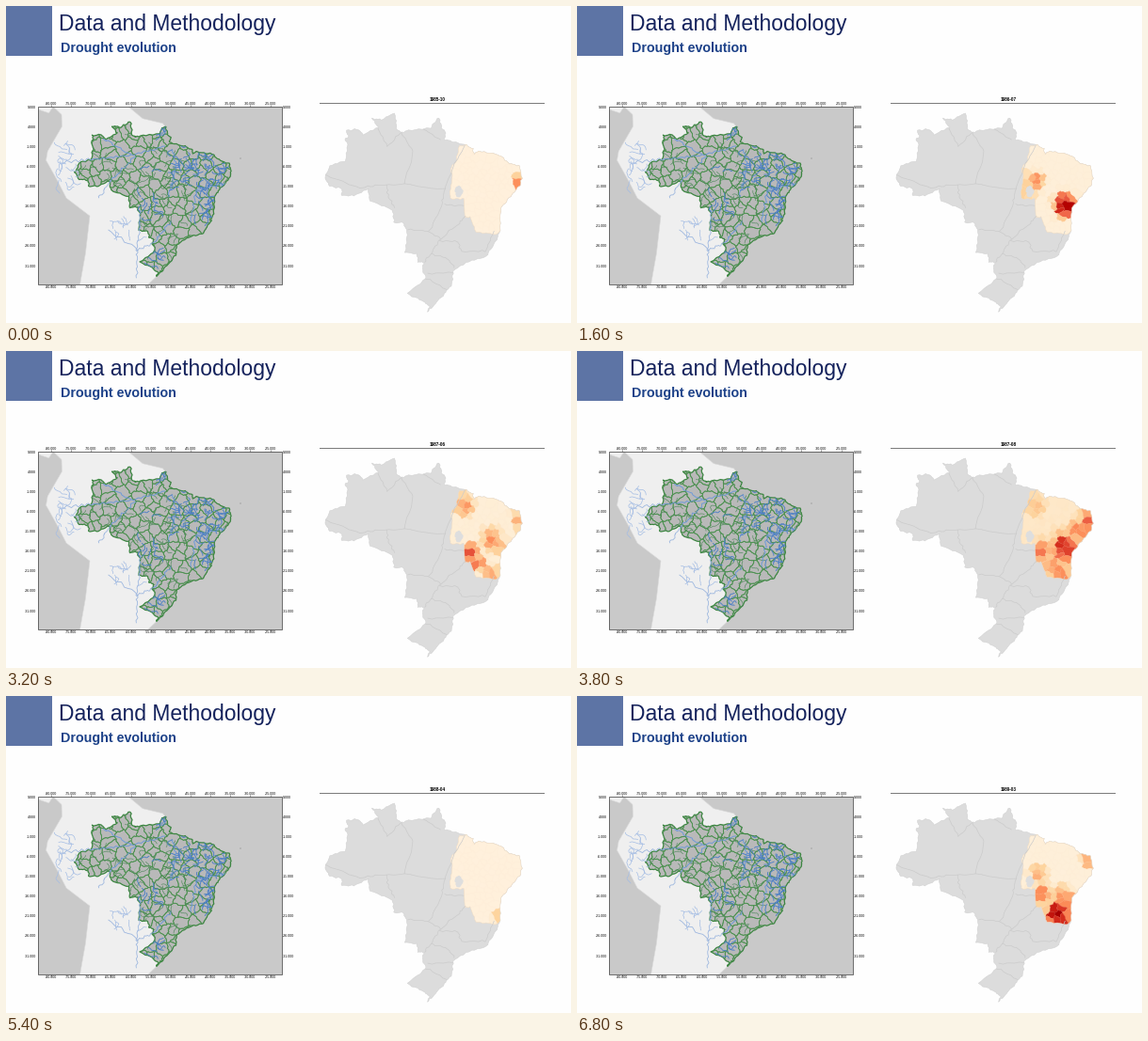
These frames come from a looping animation (600 px wide and 337 px high, 6.85 s). A matplotlib script:

```python
import numpy as np
import matplotlib.pyplot as plt
from matplotlib.animation import FuncAnimation
from matplotlib.collections import LineCollection, PolyCollection
from matplotlib.patches import Circle, Polygon, Rectangle
from matplotlib.path import Path

W, H, DPI = 600, 337, 100
FRAMES, STEP_MS = 137, 50
rng = np.random.default_rng(11)

# Longitude / latitude outlines
BORDER = [
    (-51.6, 4.1), (-52.9, 2.2), (-57.5, 1.7), (-58.9, 1.3), (-59.7, 2),
    (-60.1, 5.2), (-62.8, 3.8), (-64.6, 4.1), (-63.4, 2.4), (-66.3, 0.8),
    (-67.3, 2), (-69.8, 1.7), (-69.3, 0.7), (-70, 0), (-69.4, -1.1),
    (-69.9, -4.3), (-72.9, -5.1), (-74, -7.5), (-73, -9.2), (-70.6, -9.6),
    (-70.6, -11), (-68.3, -11), (-65.4, -9.7), (-65, -12), (-60.5, -13.8),
    (-60.2, -16.3), (-58.4, -16.3), (-57.6, -18.1), (-58, -22.1),
    (-55.7, -22.4), (-55.4, -24), (-54.3, -24.1), (-54.6, -25.5),
    (-53.8, -27.1), (-57.6, -30.2), (-54.6, -31.5), (-53.2, -32.7)]
COAST = [
    (-53.5, -33.7), (-52.1, -32.2), (-50.2, -30.2), (-48.7, -28.3),
    (-48.5, -25.8), (-45.4, -23.8), (-42, -22.95), (-41, -21.5),
    (-39.8, -19.6), (-39.2, -17.8), (-39, -13.5), (-37.4, -11.5),
    (-35.2, -9), (-34.8, -7.5), (-35.3, -5.2), (-37.2, -4.8), (-38.5, -3.7),
    (-39.9, -2.85), (-43.5, -2.4), (-44.3, -2.8), (-44.6, -1.8), (-46, -1.1),
    (-48.4, -0.5), (-50.3, 0), (-49.9, 1.2), (-50.7, 2.1), (-51.2, 3.9)]
ANDES = [
    (-54.9, -35), (-57, -37), (-73, -37), (-71.4, -28), (-70.3, -18.5),
    (-76.2, -14), (-78.5, -9.5), (-81.3, -4.5), (-80.9, -2.2), (-77.3, 4),
    (-77.4, 7), (-79.5, 9), (-80.6, 7.4), (-83.6, 8.4), (-83.6, 10),
    (-61.8, 10), (-57, 6), (-52, 4.8)]
STATES = [
    [(-58.9, 1.3), (-56.3, -2.2), (-58.2, -8.8), (-50.2, -9.8),
     (-50.7, -13), (-53.2, -18)],
    [(-73.8, -7.1), (-66.8, -9.6), (-64, -9), (-58.2, -8.8)],
    [(-61.6, -8.8), (-61.5, -11), (-60.1, -13.5)],
    [(-63.5, 2.2), (-61.5, -1.4), (-58.9, 1.3)],
    [(-54.5, 2.2), (-50.8, -0.3)],
    [(-50.2, -9.8), (-48.4, -5.3), (-46.1, -1.1)],
    [(-57.7, -17.6), (-53.2, -18), (-51, -19.5), (-53, -22.5), (-54.2, -24)],
    [(-53, -22.5), (-50, -23), (-48.1, -25.2)],
    [(-53.7, -26.3), (-48.6, -26)],
    [(-53.8, -27.2), (-49.8, -29.3)],
    [(-51, -19.8), (-47.5, -20), (-46.8, -22), (-42, -21.8), (-40.3, -18)],
    [(-51, -19.5), (-47.3, -16.5), (-46, -15)],
    [(-50.3, -12.8), (-46.2, -13)]]
RIVERS = [
    [(-77, -5), (-70, -4.2), (-60, -3.2), (-51.5, -1)],
    [(-67, 1), (-60, -3.1)],
    [(-68, -14), (-65.4, -10), (-58.7, -3.4)],
    [(-50.7, -14), (-48.6, -6), (-49.5, -2)],
    [(-45, -20), (-43.5, -12), (-36.5, -10.4)],
    [(-66, -22), (-58, -27)],
    [(-57.5, -17), (-58.4, -27), (-58.5, -34)],
    [(-50, -20), (-54.5, -25.5), (-58.5, -27.3)]]


def left(pts):
    x, y = np.asarray(pts, float).T
    return np.c_[48 + (x + 80) * 4.227, 107 + (9 - y) * 4.225]


def right(pts):
    x, y = np.asarray(pts, float).T
    return np.c_[338.5 + (x + 74) * 5.34, 113 + (5.27 - y) * 5.44]


def dense(pts, n=6):
    pts = np.asarray(pts, float)
    t = np.arange(n)[:, None] / n
    segs = [a + (b - a) * t for a, b in zip(pts[:-1], pts[1:])]
    return np.vstack(segs + [pts[-1:]])


def warp(p, a):
    x, y = p.T
    return np.c_[x + a * (np.sin(0.9 * y + 0.3 * x) + 0.6 * np.sin(1.9 * y + 2)),
                 y + a * (np.sin(0.8 * x - 0.4 * y) + 0.6 * np.sin(2.1 * x + 1))]


def sites(x0, y0, x1, y1, step):
    """Jittered staggered grid."""
    pts = []
    for j, y in enumerate(np.arange(y0, y1, step * 0.87)):
        for x in np.arange(x0 + (j % 2) * step / 2, x1, step):
            pts.append((x, y) + rng.uniform(-0.42, 0.42, 2) * step)
    return np.array(pts)


def clip_half(poly, mid, nrm):
    d = (poly - mid) @ nrm
    out = []
    for i in range(len(poly)):
        j = (i + 1) % len(poly)
        if d[i] <= 0:
            out.append(poly[i])
        if d[i] * d[j] < 0:
            out.append(poly[i] + (poly[j] - poly[i]) * d[i] / (d[i] - d[j]))
    return np.array(out)


def cells(pts, reach):
    """Wavy-edged nearest-site cells."""
    out = []
    for p in pts:
        poly = p + reach * np.array([(-1, -1), (1, -1), (1, 1), (-1, 1)])
        dist = np.hypot(*(pts - p).T)
        for q in pts[(dist > 0) & (dist < 2 * reach)]:
            poly = clip_half(poly, (p + q) / 2, q - p)
        out.append(warp(dense(np.vstack([poly, poly[:1]])), 0.55))
    return out


def brook(x, y, n):
    ang = rng.uniform(0, 2 * np.pi) + np.cumsum(rng.normal(0, 0.45, n))
    return np.c_[x + 1.3 * np.cumsum(np.cos(ang)),
                 y + 1.3 * np.cumsum(np.sin(ang))]


def brooks(count, cx, cy, sx, sy, n=10):
    return [brook(rng.normal(cx, sx), rng.normal(cy, sy), n)
            for _ in range(count)]


fig = plt.figure(figsize=(W / DPI, H / DPI), dpi=DPI, facecolor="#fefefe")
ax = fig.add_axes([0, 0, 1, 1])
ax.set(xlim=(0, W), ylim=(H, 0))
ax.axis("off")


def text(x, y, s, px, **kw):
    return ax.text(x, y, s, fontsize=px * 72 / DPI, family="Liberation Sans",
                   va="baseline", **kw)


def shape(pts, color, edge="none", lw=0, clip=None):
    p = ax.add_patch(Polygon(pts, fc=color, ec=edge, lw=lw, joinstyle="round"))
    if clip is not None:
        p.set_clip_path(clip)
    return p


def lines(segs, color, lw, clip):
    c = ax.add_collection(LineCollection(segs, colors=color, linewidths=lw))
    c.set_clip_path(clip)


def frame(**kw):
    return ax.add_patch(Rectangle((33.5, 107), 259, 189, **kw))


# Heading
ax.add_patch(Rectangle((0, 0), 48.5, 53, fc="#5d74a5", lw=0))
text(56.5, 26, "Data and Methodology", 22.9, color="#14225c")
text(57.5, 48.8, "Drought evolution", 14.2, color="#1d4289", weight="bold")

# River basin map
box = frame(fc="#c9c9c9", lw=0)
shape(left(COAST[::-1] + ANDES), "#efefef", "#dadada", 0.4, box)
rim = BORDER + COAST + BORDER[:1]
outline = warp(dense(left(rim)), 0.5)
brazil = shape(outline, "#b9b9b9", clip=box)

streams = [warp(dense(left(r), 14), 0.9) for r in RIVERS]
lines(streams, "#9db7df", 0.6, box)
lines(cells(sites(70, 118, 245, 292, 11.5), 20), "#4c9150", 0.6, brazil)
lines(brooks(130, 150, 190, 38, 38), "#4f8a5c", 0.45, brazil)
lines(streams, "#6f97cf", 0.6, brazil)
lines(brooks(36, 194, 170, 16, 12) + brooks(34, 215, 205, 7, 16)
      + brooks(12, 230, 176, 5, 7) + brooks(8, 168, 136, 3, 6)
      + brooks(14, 165, 270, 9, 11) + brooks(12, 150, 212, 8, 10),
      "#4d80c6", 0.65, brazil)
lines(brooks(16, 60, 172, 7, 12, 14) + brooks(10, 126, 240, 12, 6),
      "#a3bce4", 0.5, box)
shape(outline, "none", "#3c8541", 0.9, box)
ax.add_patch(Circle((249, 162), 0.6, fc="#888888", lw=0))
frame(fc="none", ec="#555555", lw=0.6)

for i in range(12):
    x, name = 48 + i * 21.14, f"{-80 + 5 * i}.000"
    for y, tick in ((104.8, 106), (300.4, 297)):
        text(x, y, name, 3.6, ha="center")
        ax.plot([x, x], [tick - 0.8, tick + 0.8], color="#555555", lw=0.4)
for i in range(9):
    y, name = 108.7 + i * 21.1, f"{9 - 5 * i}.000"
    text(32, y, name, 3.6, ha="right")
    text(293.8, y, name, 3.6, ha="left")

# Drought map
ax.plot([333, 571], [103, 103], color="#777777", lw=0.7)
stamp = text(458.5, 100.9, "", 4.6, ha="center", weight="bold")
country = shape(warp(dense(right(rim)), 0.5), "#dcdcdc", "#d2d2d2", 0.4)
lines([warp(dense(right(s)), 0.7) for s in STATES], "#cbcbcb", 0.5, country)

EDGE = [(481, 149), (478, 166), (472, 172), (474, 181), (471, 201),
        (474, 205), (486, 205), (487, 225), (493, 224), (499, 240), (521, 243)]
shore = right(COAST[COAST.index((-39.2, -17.8)):COAST.index((-46, -1.1)) + 1])
region = shape(warp(dense(np.vstack([shore, EDGE, shore[:1]])), 0.5), "#fdf2e3")
seeds = sites(468, 144, 553, 248, 7.2)
seeds = seeds[Path(region.get_xy()).contains_points(seeds, radius=4)]
areas = PolyCollection(cells(seeds, 16), linewidths=0.3)
ax.add_collection(areas)
areas.set_clip_path(region)
turn = np.linspace(0, 2 * np.pi, 25)
shape(warp(np.c_[481 + 4.2 * np.cos(turn), 197 + 6 * np.sin(turn)], 0.6),
      "#dedede")
shape(region.get_xy(), "none", "#ead9c4", 0.35)

# Months since Oct 1985 at set frames, with blobs of x, y, radius, level
KEY_FRAMES = [0, 32, 49, 64, 88, 108, 136]
KEY_MONTHS = [0, 9, 17, 20, 24, 30, 41]
BASES = [0.02, 0.03, 0.05, 0.04, 0.15, 0.02, 0.03]
BLOBS = [
    [(543, 185, 4, 0.5)],
    [(518, 212, 9, 0.8), (489, 186, 6, 0.47), (480, 190, 11, 0.23)],
    [(495, 211, 11, 1.05), (483, 186, 13, 0.9), (493, 167, 9, 0.72),
     (517, 168, 11, 0.55), (512, 218, 13, 0.6), (531, 166, 9, 0.3)],
    [(487, 164, 8, 0.42), (494, 214, 7, 0.58), (516, 200, 9, 0.44),
     (502, 226, 5, 0.66), (541, 181, 5, 0.34), (513, 236, 6, 0.38)],
    [(517, 211, 11, 1.08), (532, 190, 8, 0.9), (542, 182, 8, 0.78),
     (510, 235, 9, 0.58), (493, 209, 11, 0.42)],
    [(521, 233, 4, 0.2)],
    [(510, 231, 9, 0.86), (495, 210, 8, 0.45), (490, 190, 7, 0.36),
     (515, 214, 8, 0.42), (541, 176, 5, 0.34)]]
rough = rng.uniform(0.88, 1.1, len(seeds))


def field(base, blobs):
    v = np.full(len(seeds), base)
    for x, y, r, level in blobs:
        d2 = ((seeds - (x, y)) ** 2 @ [1, 0.7]) / r ** 2
        v = np.maximum(v, level * np.exp(-0.5 * d2 ** 1.4))
    return v * rough


levels = np.array([field(b, s) for b, s in zip(BASES, BLOBS)])


def update(i):
    m = int(np.interp(i, KEY_FRAMES, KEY_MONTHS) + 1e-6)
    j = min(np.searchsorted(KEY_MONTHS, m, "right") - 1, len(levels) - 2)
    t = (m - KEY_MONTHS[j]) / (KEY_MONTHS[j + 1] - KEY_MONTHS[j])
    v = levels[j] * (1 - t) + levels[j + 1] * t
    colors = plt.cm.OrRd(np.clip(0.04 + v, 0, 1))
    areas.set_facecolor(colors)
    areas.set_edgecolor(colors * 0.85 + 0.15 * np.array([1, 0.9, 0.8, 1]))
    year, month = divmod(1985 * 12 + 9 + m, 12)
    stamp.set_text(f"{year}-{month + 1:02d}")
    return areas, stamp


anim = FuncAnimation(fig, update, frames=FRAMES, interval=STEP_MS,
                     repeat=True, repeat_delay=0)
plt.show()
```
